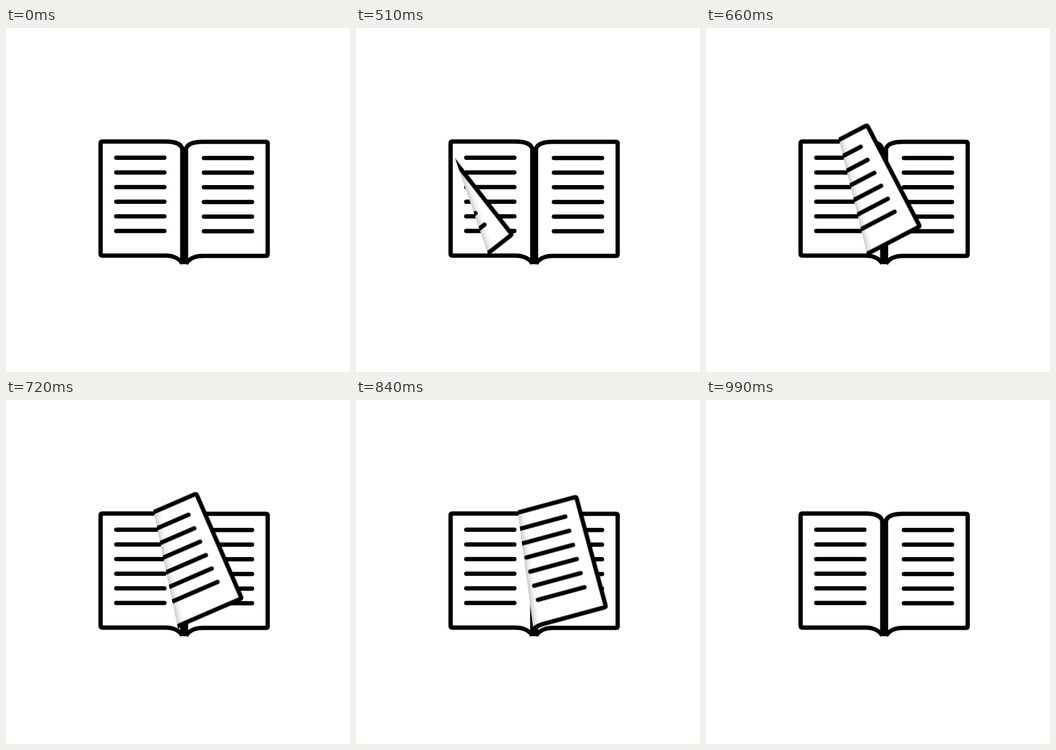
Animation, 600 px wide and 600 px high, one loop 1.05 s. Source, as an HTML page without scripts:

```html
<!DOCTYPE html>
<html lang="en">
<head>
<meta charset="utf-8">
<title>Turning page</title>
<style>
  /* how far the lifted corner has moved right and up */
  @property --dx { syntax: "<number>"; inherits: true; initial-value: 0; }
  @property --dy { syntax: "<number>"; inherits: true; initial-value: 0; }

  html, body { margin: 0; width: 100%; height: 100%; overflow: hidden; background: #fff; }
  svg { display: block; width: 100%; height: 100%; }
  .ink { fill: none; stroke: #000; stroke-width: 7.5; }
  .lines { stroke-linecap: round; }

  /* the fold is the perpendicular bisector between the corner's rest and lifted places */
  .flap {
    --mx: calc(165px + var(--dx) * .5px);
    --my: calc(397px - var(--dy) * .5px);
    --a: atan2(-1 * var(--dy), var(--dx));
    opacity: 0;
    animation: turn 1050ms steps(1, end) infinite;
  }
  .fold { transform: translate(var(--mx), var(--my)) rotate(var(--a)); }
  .mirror { transform: scale(-1, 1) rotate(calc(-1 * var(--a))) translate(calc(-1 * var(--mx)), calc(-1 * var(--my))); }
  .shade { transform: translate(var(--mx), var(--my)) rotate(var(--a)) scale(-1, 1); }

  @keyframes turn {
    0%     { opacity: 0; --dx: 0; --dy: 0; }
    34.28% { opacity: 1; --dx: 0; --dy: 0; animation-timing-function: steps(2, end); }
    40%    { --dx: 43; --dy: 17.8; animation-timing-function: steps(2, end); }
    45.71% { --dx: 86; --dy: 31.8; animation-timing-function: steps(2, end); }
    51.42% { --dx: 128; --dy: 41.9; animation-timing-function: steps(2, end); }
    57.14% { --dx: 167; --dy: 48; animation-timing-function: steps(2, end); }
    62.85% { --dx: 208; --dy: 51; animation-timing-function: steps(2, end); }
    68.57% { --dx: 246; --dy: 51; }
    71.42% { --dx: 258; --dy: 49.7; }
    74.28% { --dx: 264.5; --dy: 45.5; animation-timing-function: steps(2, end); }
    80%    { --dx: 271; --dy: 36; animation-timing-function: steps(3, end); }
    88.57% { --dx: 280; --dy: 15; }
    91.42% { opacity: 1; --dx: 283; --dy: 8; }
    94.28%, 100% { opacity: 0; --dx: 283; --dy: 8; }
  }
</style>
</head>
<body>
<svg viewBox="0 0 600 600">
  <defs>
    <path id="sheet" d="M307.5 211C306 203 296 198 278 198H168Q165 198 165 201V394Q165 397 168 397H278C293 397 303 403 307.5 411"/>
    <path id="text" class="ink lines" d="M192.3 226.3h83.9M192.3 251.9h83.9M192.3 277.4h83.9M192.3 303h83.9M192.3 328.5h83.9M192.3 354.1h83.9"/>
    <g id="page">
      <use href="#sheet" class="ink"/>
      <use href="#text"/>
    </g>
    <clipPath id="half"><rect x="6.3" y="-400" width="400" height="800"/></clipPath>
    <clipPath id="inside"><use href="#sheet"/></clipPath>
    <linearGradient id="fade">
      <stop offset="0" stop-opacity=".22"/>
      <stop offset=".45" stop-opacity=".07"/>
      <stop offset="1" stop-opacity="0"/>
    </linearGradient>
  </defs>

  <use href="#page"/>
  <use href="#page" transform="matrix(-1 0 0 1 621.4 .4)"/>
  <path d="M303.7 210H317.7V412H303.7Z"/>

  <g class="flap">
    <g class="fold">
      <g clip-path="url(#half)">
        <g class="mirror">
          <use href="#sheet" fill="#fff"/>
          <use href="#page"/>
          <g clip-path="url(#inside)">
            <rect class="shade" x="6" y="-400" width="14" height="800" fill="url(#fade)"/>
          </g>
        </g>
      </g>
    </g>
  </g>
</svg>
</body>
</html>
```
